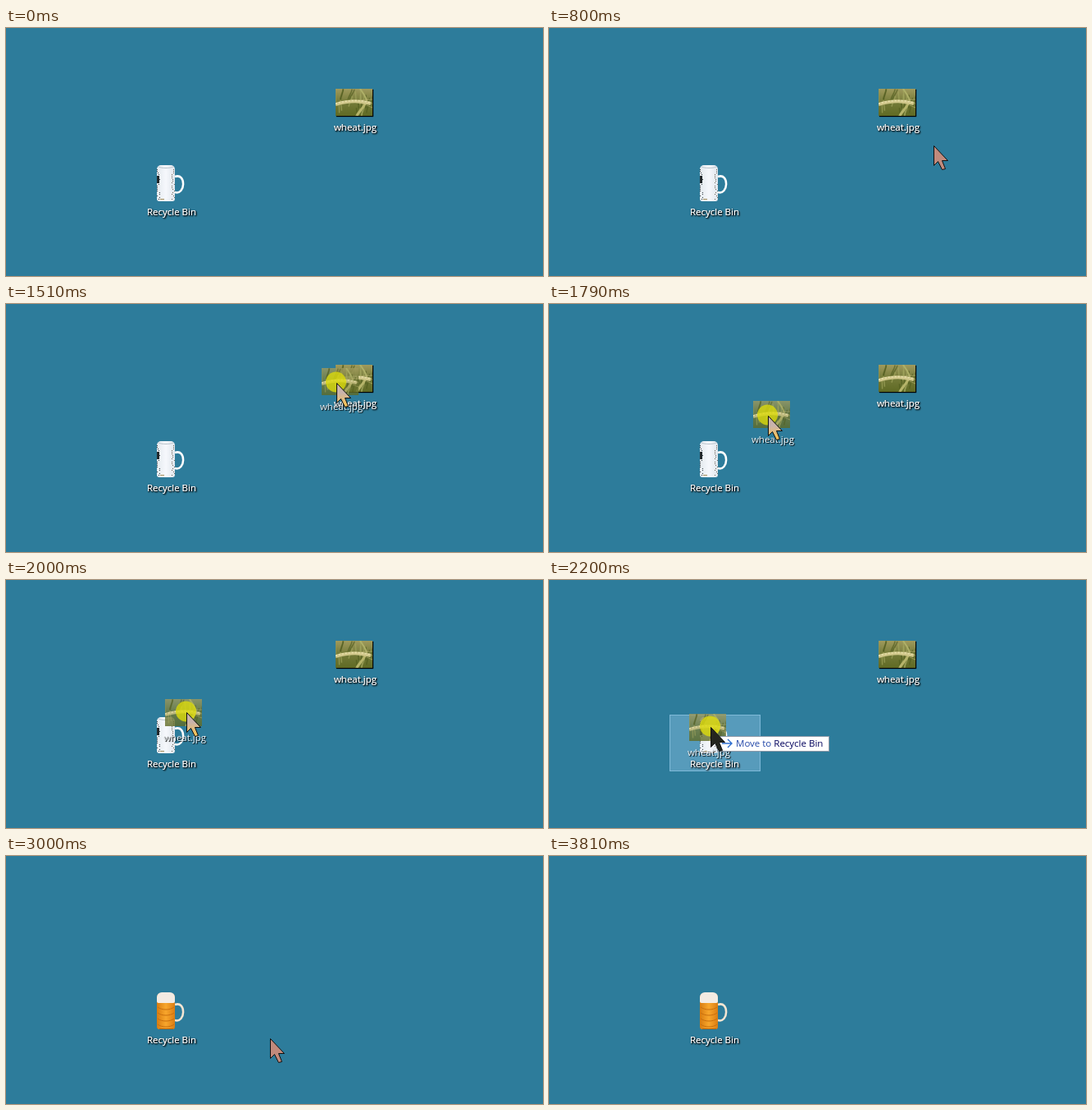
An HTML page with a canvas for the animation above (5020 ms loop, 655 by 302 pixels).

```html
<!DOCTYPE html>
<html lang="en">
<head>
<meta charset="utf-8">
<title>Drag to bin</title>
<style>
  html, body { margin: 0; width: 100%; height: 100%; overflow: hidden; background: #2d7c9b; }
  canvas { display: block; }
</style>
</head>
<body>
<canvas id="stage" width="655" height="302"></canvas>
<script>
const ctx = document.getElementById('stage').getContext('2d');
const LOOP = 5020, ENTER = 530, PRESS = 1370, LIFT = 1440, OVER_BIN = 2060;
const DROP = 2680, FILLED = 2740, GONE = 3810;

const linear = u => u;
const easeOut = u => 1 - (1 - u) ** 1.7;
const smooth = u => u * u * (3 - 2 * u);
const soft = u => u - Math.sin(2 * Math.PI * u) / 25;

// Each move leads on from the end of the one before, in whole steps.
const HOME = { x: 583, y: 285 };
const moves = [
  { start: ENTER, steps: 7, end: 1010, x: 433, y: 99, ease: easeOut },
  { start: 1010, steps: 2, end: 1150, x: 428, y: 89, ease: linear },
  { start: LIFT, steps: 6, end: 1860, x: 242, y: 143, ease: soft },
  { start: 1860, steps: 7, end: 2340, x: 191, y: 184, ease: easeOut },
  { start: 2400, steps: 1, end: 2470, x: 192, y: 186, ease: linear },
  { start: DROP, steps: 7, end: 3138, x: 406, y: 246, ease: smooth },
  { start: 3530, steps: 4, end: GONE, x: 655, y: 313, ease: linear }
];

function pointerAt(t) {
  if (t < ENTER || t >= GONE) return null;
  let { x, y } = HOME;
  for (const m of moves) {
    const step = Math.floor((t - m.start + 6) / (m.end - m.start) * m.steps);
    const u = m.ease(Math.min(1, Math.max(0, step / m.steps)));
    x += (m.x - x) * u;
    y += (m.y - y) * u;
  }
  return { x: Math.round(x), y: Math.round(y) };
}

function seeded(seed) {
  return () => (seed = seed * 16807 % 2147483647) / 2147483647;
}

function rect(x, y, w, h, fill) {
  ctx.fillStyle = fill;
  ctx.fillRect(x, y, w, h);
}

function rounded(x, y, w, h, radii, fill) {
  ctx.fillStyle = fill;
  ctx.beginPath();
  ctx.roundRect(x, y, w, h, radii);
  ctx.fill();
}

function curve(color, width, x, y, ...ctrl) {
  ctx.strokeStyle = color;
  ctx.lineWidth = width;
  ctx.beginPath();
  ctx.moveTo(x, y);
  ctx.bezierCurveTo(...ctrl);
  ctx.stroke();
}

function gradient(x0, y0, x1, y1, ...colors) {
  const g = ctx.createLinearGradient(x0, y0, x1, y1);
  colors.forEach((c, i) => g.addColorStop(i / (colors.length - 1), c));
  return g;
}

function text(str, x, y, color, align = 'left') {
  ctx.font = '11.5px "Open Sans", "Noto Sans", sans-serif';
  ctx.textAlign = align;
  ctx.fillStyle = color;
  ctx.fillText(str, x, y);
}

function shadowed(blur, draw) {
  ctx.save();
  ctx.shadowColor = '#000';
  ctx.shadowBlur = blur;
  ctx.shadowOffsetX = ctx.shadowOffsetY = 1;
  draw();
  ctx.restore();
}

function label(str, x, y) {
  for (let pass = 0; pass < 2; pass++) shadowed(2, () => text(str, x, y, '#fff', 'center'));
}

function highlight(x, y, strength) {
  rect(x, y, 111, 69, `rgba(150,200,235,${0.4 * strength})`);
  ctx.strokeStyle = `rgba(165,215,245,${0.5 * strength})`;
  ctx.lineWidth = 1;
  ctx.strokeRect(x + 0.5, y + 0.5, 110, 68);
}

function photo(x, y) {
  const random = seeded(77);
  ctx.save();
  ctx.translate(x, y);
  ctx.beginPath();
  ctx.rect(0, 0, 45, 33);
  ctx.clip();
  rect(0, 0, 45, 33, gradient(0, 0, 0, 33, '#a09a5c', '#737a38', '#5f6a24'));
  for (let i = 0; i < 26; i++) {
    const sx = random() * 48, top = random() * 24, lean = random() * 8 - 2;
    curve(i % 2 ? '#4d5a1ca0' : '#a3a760a0', 1.5, sx, top + 13, sx, top + 9, sx + lean, top + 4, sx + lean, top);
  }
  curve('#b6b46a', 3, 26, 33, 28, 28, 33, 25, 36, 18);
  curve('#aeb068', 2, 30, 0, 33, 5, 37, 9, 38, 15);
  for (let i = 0; i < 3; i++) curve('#c6bd7c90', 1, 20, 16, 28, 14 + i, 36, 13 + i * 3, 45, 13 + i * 5);
  curve('#d0c78a', 4, 0, 19, 13, 15, 29, 14, 43, 18);
  ctx.setLineDash([2, 2]);
  curve('#ebe2b0', 1.5, 0, 18, 13, 14, 29, 13, 43, 17);
  ctx.restore();
}

function mug(full) {
  const random = seeded(12);
  curve(full ? '#f5e6d3' : '#fff', 2.5, 206, 181, 220, 176, 219, 204, 206, 200);
  const body = full ? ['#d87c10', '#f8a62c', '#db7d12'] : ['#e4eaef', '#f6f8fc', '#e0e6ed'];
  rounded(184, 167, 22, 44, [5, 5, 3, 3], gradient(184, 0, 206, 0, ...body));
  if (full) {
    rounded(184, 166, 22, 13, [6, 6, 2, 2], '#f4ebe2');
    for (let y = 184; y < 210; y += 7) curve('#c96f0e', 1, 185, y, 190, y + 4, 200, y + 4, 205, y);
    rect(187, 210, 17, 1, '#b5640f');
    return;
  }
  curve('#b9c3cb', 1, 186, 169, 190, 171, 200, 171, 204, 169);
  for (let y = 172; y < 210; y += 2) {
    rect(184 + Math.floor(random() * 4), y, 1, 1, '#333b40');
    rect(202 + Math.floor(random() * 4), y, 1, 1, '#6f6557');
  }
  rect(184, 180, 3, 9, '#22282b');
  rect(188, 208, 5, 1, '#a8905c');
}

function tooltip(x, y) {
  rect(x + 8, y + 11, 137, 19, '#8e9aa8');
  rect(x + 9, y + 12, 135, 17, '#fff');
  ctx.strokeStyle = '#2f6fd0';
  ctx.lineWidth = 1.4;
  ctx.stroke(new Path2D(`M${x + 14} ${y + 20}h12m-5 -5l5 5l-5 5`));
  text('Move to ', x + 31, y + 24, '#2348a8');
  text('Recycle Bin', x + 31 + ctx.measureText('Move to ').width, y + 24, '#00005c');
}

function pointer(x, y, head, tail) {
  const arrow = new Path2D(`M${x + 0.5} ${y + 0.5}v24l5 -5l5 10l4 -1l-4 -10h7z`);
  ctx.fillStyle = gradient(0, y + 12, 0, y + 26, head, tail);
  ctx.fill(arrow);
  ctx.strokeStyle = '#101010';
  ctx.lineWidth = 1;
  ctx.stroke(arrow);
}

function pointerColors(t) {
  if (t < PRESS || t >= FILLED) return ['#c08a7c', '#c08a7c'];
  if (t < OVER_BIN) return ['#c9b3ac', '#f2c25c'];
  return t < 2470 ? ['#24261f', '#24261f'] : ['#857d8c', '#857d8c'];
}

function ghost(x, y) {
  ctx.globalAlpha = 0.8;
  photo(x, y);
  ctx.globalAlpha = 1;
  shadowed(1, () => text('wheat.jpg', x + 24, y + 51, '#f2f7fa', 'center'));
}

function draw(t) {
  const tip = pointerAt(t);
  const overBin = t >= OVER_BIN && t < FILLED;
  rect(0, 0, 655, 302, '#2d7c9b');

  if (t < FILLED) {
    if (t >= 870 && t < LIFT) highlight(371, 61, 0.5);
    shadowed(1, () => rect(402, 74, 45, 33, '#66702c'));
    photo(402, 74);
    label('wheat.jpg', 426, 125);
  }

  const hovering = t >= FILLED && tip && tip.x < 258 && tip.y < 233;
  if (overBin || hovering) highlight(147, 164, overBin ? 1 : 0.5);
  mug(t >= FILLED);
  label('Recycle Bin', 202, 228);
  if (!tip) return;

  const { x, y } = tip;
  if (t >= LIFT && t < FILLED) {
    // The dragged copy trails the hand until it nears the bin.
    if (t < 1930) ghost(x - 18, y - 18);
    else ghost(x - 26, y - 16);
  }
  if (t >= PRESS && t < DROP) {
    ctx.fillStyle = 'rgba(222,220,10,.78)';
    ctx.beginPath();
    ctx.arc(x - 0.5, y - 1, 12.5, 0, 7);
    ctx.fill();
  }
  if (overBin) tooltip(x, y);
  pointer(x, y, ...pointerColors(t));
}

const begin = performance.now();
function frame() {
  draw((performance.now() - begin) % LOOP);
  requestAnimationFrame(frame);
}
frame();
</script>
</body>
</html>
```
